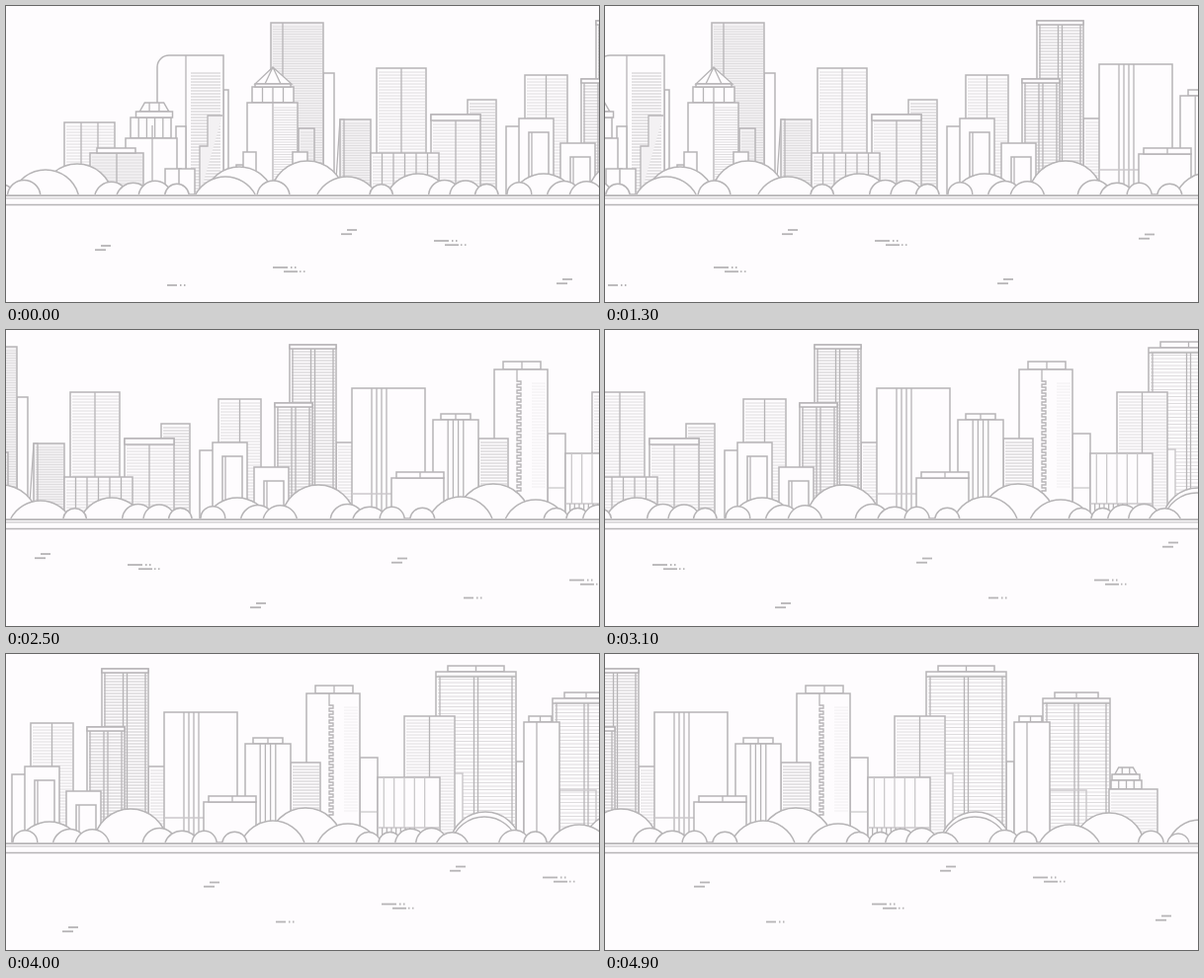
An HTML page for the animation above (5000 ms loop, 600 px wide and 300 px high).

```html
<!DOCTYPE html>
<html lang="en">
<head>
<meta charset="utf-8">
<title>Skyline</title>
<style>
html, body { margin: 0; width: 100%; height: 100%; overflow: hidden; background: #fefcfe; }
#stage { position: relative; width: 600px; height: 300px; overflow: hidden; }
/* 25 px every 200 ms, split into a 10 px and a 15 px step */
#pan { animation: pan 5s steps(25) infinite; }
#nudge { animation: nudge .2s step-end infinite; }
@keyframes pan { to { transform: translateX(-625px); } }
@keyframes nudge { 0% { transform: none; } 50%, 100% { transform: translateX(-10px); } }
svg { display: block; }
</style>
</head>
<body>
<div id="stage"><div id="pan"><div id="nudge">
<svg id="city" width="1240" height="300" viewBox="0 0 1240 300"></svg>
</div></div></div>
<script>
const BASE = 191, PAPER = '#fefcfe', INK = '#b6b4b6', MID = '#cbc9cb', PALE = '#dedcde', TINT = '#f3f1f3';
let out = '', seed = 7;
const rnd = () => (seed = seed * 16807 % 2147483647) / 2147483647;

const path = (d, c = INK, w = 1.5, fill = 'none') =>
  out += `<path d="${d}" fill="${fill}" stroke="${c}" stroke-width="${w}"/>`;
const box = (x1, y1, x2, y2 = BASE, fill = PAPER, c = INK) =>
  path(`M${x1} ${y1}H${x2}V${y2}H${x1}Z`, c, 1.5, fill);
const col = (x, y1, y2 = BASE, c = INK, w = 1.3) => path(`M${x} ${y1}V${y2}`, c, w);
const row = (x1, x2, y, c = INK, w = 1.3) => path(`M${x1} ${y}H${x2}`, c, w);

function hatch(x1, y1, x2, y2 = BASE, gap = 3, c = PALE) {
  for (let y = y1; y < y2; y += gap) row(x1, x2, y, c, 1);
}
// Evenly spaced uprights between two edges
function ribs(x1, x2, n, y1, y2 = BASE, c = INK) {
  for (let i = 1; i <= n; i++) col(x1 + (x2 - x1) * i / (n + 1), y1, y2, c);
}
// Block with floor lines and, if asked, a centre line
function block(x1, y, x2, { gap = 3, tone = PALE, fill = PAPER, mid = false } = {}) {
  box(x1, y, x2, BASE, fill);
  hatch(x1 + 2, y + 4, x2 - 1, BASE, gap, tone);
  if (mid) ribs(x1, x2, 1, y);
}
// Flat box on a roof, split down the middle
function cap(x1, x2, roof, h = 6) {
  box(x1, roof - h, x2, roof);
  ribs(x1, x2, 1, roof - h, roof);
}
function arch(x1, y, x2) {
  box(x1, y, x2);
  box(x1 + 10, y + 14, x2 - 5);
  col(x1 + 13, y + 14);
}
// Office tower: roof box, band, edge lines, double spine
function office(x1, x2, y) {
  const mid = (x1 + x2) / 2;
  cap(x1 + 12, x2 - 12, y);
  block(x1, y, x2, { gap: 3.5 });
  row(x1, x2, y + 5);
  for (const x of [x1 + 4, mid - 2, mid + 2, x2 - 4]) col(x, y + 5);
}
// Tower of two louvred halves
function twin(x1, y, x2) {
  const mid = (x1 + x2) / 2;
  block(x1, y, x2, { tone: MID });
  box(x1, y, x2, y + 4);
  for (const x of [x1 + 3, mid - 2, mid + 2, x2 - 3]) col(x, y + 4);
}
// Stepped crown: trapezoid over a rim
function crown(x, y, w, h) {
  path(`M${x - w * .4} ${y}l${w * .14} ${-h}h${w * .52}l${w * .14} ${h}Z`, INK, 1.5, PAPER);
  ribs(x - w * .4, x + w * .4, 2, y - h, y);
  box(x - w / 2, y, x + w / 2, y + 6);
}

function west() {
  block(59, 118, 110);
  ribs(59, 110, 2, 118);

  box(220, 85, 225);
  path(`M153 ${BASE}V62A12 12 0 0 1 165 50H220V${BASE}`, INK, 1.5, PAPER);
  hatch(187, 68, 217, BASE, 3, MID);
  col(182, 50);
  path(`M196 ${BASE}V142H204V111H219`, INK, 1.3, TINT);

  box(172, 122, 182);
  box(126, 113, 167, 134);
  ribs(126, 167, 4, 113, 134);
  crown(150, 107, 37, 9);
  box(121, 134, 173);
  col(148, 121);
  block(85, 149, 139, { fill: TINT, mid: true });
  box(92, 144, 131, 149);
  box(161, 165, 177);
  box(175, 165, 191);

  box(321, 68, 332);
  block(268, 17, 321, { gap: 2.5, fill: TINT });
  col(280, 17);
  block(296, 124, 312, { fill: TINT });
  path('M270 62L289 79H252ZL262 79M270 62L278 79', INK, 1.3, PAPER);
  box(249, 82, 291, 98);
  box(252, 79, 288, 82);
  ribs(249, 291, 3, 82, 98);
  box(244, 98, 295);
  hatch(271, 103, 294, BASE, 2.5);
  col(270, 98);
  box(233, 161, 240);
  box(240, 148, 253);
  box(290, 148, 305);

  path(`M338 115L333 ${BASE}H342V115Z`, INK, 1.3, PAPER);
  block(338, 115, 369, { gap: 2.5, fill: TINT });
  col(342, 115);
}

function middle() {
  block(375, 63, 425, { mid: true });
  block(467, 95, 496, { tone: MID });
  block(430, 110, 480, { mid: true });
  box(430, 110, 480, 116);
  block(369, 149, 438);
  ribs(369, 438, 5, 149);

  box(506, 122, 520);
  block(525, 70, 568, { mid: true });
  arch(519, 114, 554);
  block(644, 114, 661);
  twin(597, 15, 644);
  twin(582, 74, 620);
  arch(561, 139, 596);

  box(660, 59, 734);
  ribs(675, 700, 4, 59);
  row(660, 700, 166, MID);
}

function east() {
  box(858, 105, 876);
  row(858, 876, 160, MID);
  cap(813, 851, 40, 8);
  box(804, 40, 858);
  path('M827 40V52' + 'h4v3h-4v3'.repeat(19) + `V${BASE}`, INK, 1.3);
  hatch(842, 54, 856, 160, 3, '#f1eff1');
  block(788, 110, 818, { tone: MID });
  cap(750, 780, 91);
  box(742, 91, 788);
  ribs(752, 778, 4, 91);
  box(700, 150, 753);
  cap(705, 753, 150);

  box(1016, 109, 1024);
  office(935, 1016, 18);
  box(953, 121, 962, BASE, PAPER, MID);
  block(903, 63, 954, { mid: true });
  box(876, 125, 939);
  ribs(872, 934, 5, 125, 176, MID);
  row(876, 939, 176, MID);
  ribs(876, 918, 8, 176);

  office(1053, 1121, 45);
  box(1060, 138, 1097, BASE, 'none', MID);
  cap(1029, 1052, 69);
  box(1024, 69, 1060);
  col(1037, 69);

  crown(1137, 122, 28, 7);
  box(1122, 128, 1153, 137);
  ribs(1122, 1153, 3, 128, 137);
  block(1120, 137, 1169);
}

// Arc of a circle resting on the ground
function mound(x, h, w) {
  const r = (w * w + h * h) / (2 * h);
  path(`M${x - w} ${BASE}A${r} ${r} 0 0 1 ${x + w} ${BASE}`, INK, 1.5, PAPER);
}
// A hedge: tall crowns behind, a run of low puffs in front
function hedge(x1, x2, ...crowns) {
  const width = h => 22 + h * .45;
  crowns.forEach(([x, h]) => mound(x, h, width(h)));
  const n = Math.round((x2 - x1) / 22), step = (x2 - x1) / n;
  for (let i = 0; i < n; i++) {
    const x = x1 + (i + .5) * step, h = 10 + 5 * rnd();
    const hidden = crowns.some(([cx, ch]) => Math.abs(x - cx) < width(ch) * .6);
    if (!hidden) mound(x, h, step * (i % (n - 1) ? .75 : .55));
  }
}

// Ripple kinds: 0 plain pair, 1 dotted pair, 2 single
function ripple(x, y, kind) {
  const dash = (x, y, len) => row(x, x + len, y, INK, 1.8);
  const dots = (x, y) => { dash(x, y, 1.5); dash(x + 4, y, 1.5); };
  dash(x, y, kind === 1 ? 15 : 10);
  if (kind === 0) dash(x - 6, y + 4.2, 11);
  if (kind === 1) { dash(x + 11, y + 4.2, 14); dots(x + 27, y + 4.2); }
  if (kind) dots(x + (kind === 1 ? 18 : 13), y);
}

west();
middle();
east();

hedge(-15, 184, [72, 31], [40, 25]);
hedge(194, 369, [236, 28], [222, 18], [305, 34], [345, 18]);
hedge(369, 497, [417, 21]);
hedge(508, 712, [544, 21], [626, 34]);
hedge(720, 878, [803, 35], [770, 22], [846, 19]);
hedge(878, 1046, [985, 31], [984, 26]);
hedge(1058, 1174, [1120, 30], [1080, 18]);
hedge(1180, 1240, [1212, 23]);

out += `<rect y="${BASE}" width="1240" height="109" fill="${PAPER}"/>`;
row(0, 1240, 192.2, INK, 1.8);
row(0, 1240, 194.8, MID);
row(0, 1240, 201.5, INK, 1.5);

const ripples = [[96, 243, 0], [345, 227, 0], [563, 277, 0], [433, 238, 1], [270, 265, 1], [163, 283, 2]];
for (const [x, y, kind] of ripples) {
  ripple(x, y, kind);
  ripple(x + 610, y - 11.5, kind);
}
document.getElementById('city').innerHTML = out;
</script>
</body>
</html>
```
